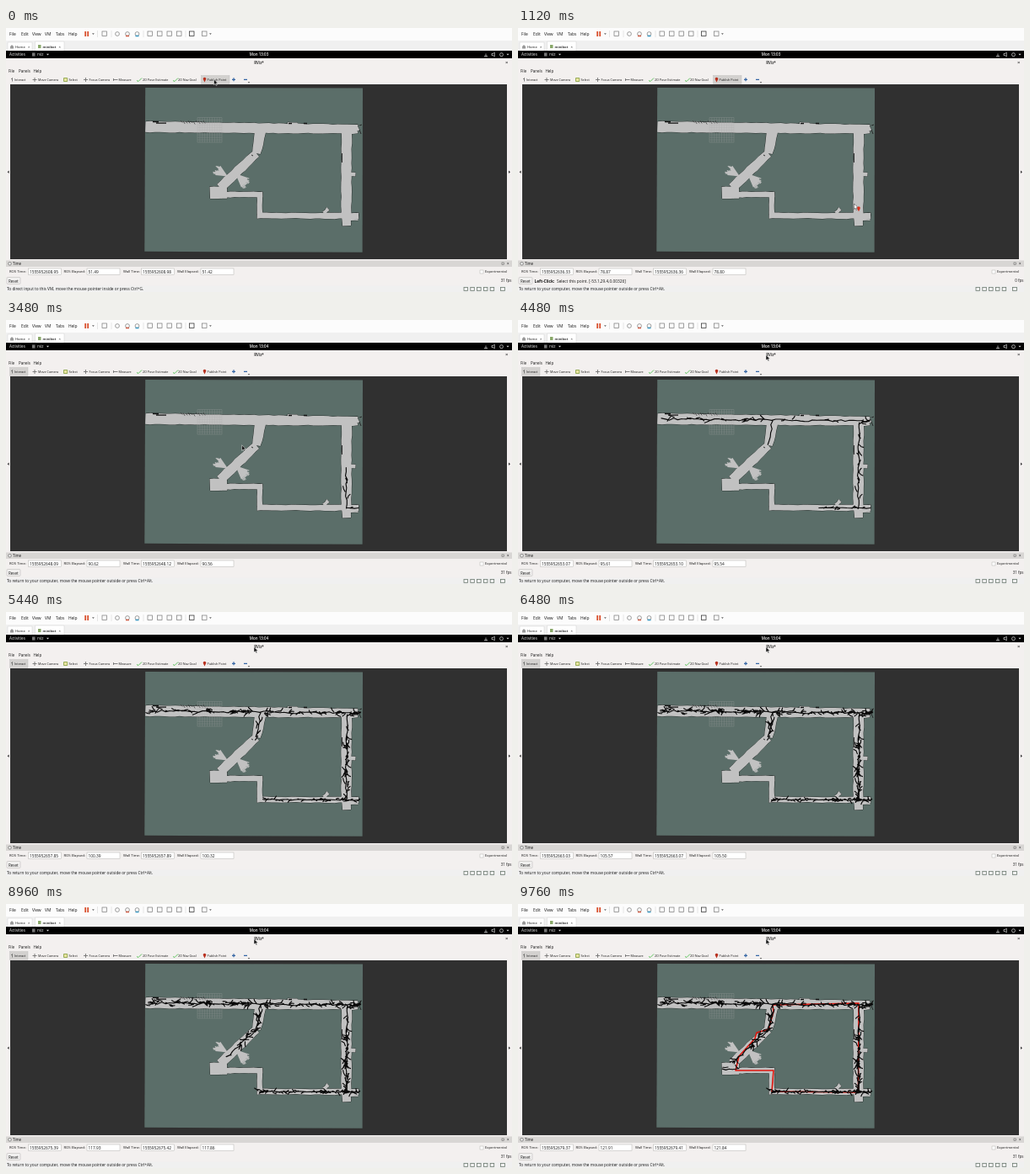
These frames come from a looping animation (600 px wide and 314 px high, 9800 ms). An HTML page:

```html
<!DOCTYPE html>
<html lang="en">
<head>
<meta charset="utf-8">
<title>RViz path planning</title>
<style>
  html, body { margin: 0; width: 100%; height: 100%; overflow: hidden; background: #fff; }
  svg { display: block; width: 100vw; height: 100vh; }
  text { font-family: "Open Sans", "Noto Sans", sans-serif; fill: #161616; white-space: pre; }
  .bold { font-weight: 700; }
  .semi { font-weight: 600; }
  .light { fill: #f0f0f0; }
</style>
</head>
<body>
<svg viewBox="0 0 600 314">
  <rect width="600" height="314" fill="#f3f0ef"/>

  <!-- virtual machine window -->
  <rect width="600" height="15" fill="#fcfcfc"/>
  <rect y="15" width="600" height="12" fill="#f0f0f0"/>
  <path d="M2 27V17H31V27M34.500 27V16H69V27" fill="#fff" stroke="#d0d0d0" stroke-width=".5"/>
  <path d="M5 22l2-2l2 2v2.500h-4z" fill="#999"/>
  <rect x="38" y="20" width="3.500" height="4" fill="#8aa86a"/>
  <path d="M93.300 4h1.800v6h-1.800zM96.300 4h1.800v6h-1.800z" fill="#d9502e"/>
  <path d="M102 6.300h2.800l-1.400 1.600zM241 6.300h2.800l-1.400 1.600z" fill="#666"/>
  <g id="vmIcons" fill="none" stroke="#777" stroke-width=".7"/>
  <path d="M142 9.500h4" stroke="#d0614a" stroke-width="1.600"/>
  <path d="M153.500 9.500h4" stroke="#3f9ac4" stroke-width="1.600"/>

  <!-- desktop bar -->
  <rect y="27" width="600" height="9" fill="#000"/>
  <rect x="31" y="29.500" width="3.500" height="4" fill="#777"/>
  <path d="M48 30.800h3l-1.500 1.700zM593.500 30.800h3l-1.500 1.700z" fill="#ddd"/>
  <path d="M567 33.500h4M569 33.500v-3M576 30.500h1.500l1.800-1.300v4.600l-1.800-1.300h-1.500z" fill="none" stroke="#ddd" stroke-width=".7"/>
  <circle cx="587.500" cy="31.700" r="2" fill="none" stroke="#ddd" stroke-width=".7"/>

  <!-- application window -->
  <rect id="interactOn" x="4.500" y="56.500" width="21.500" height="9.700" fill="#d3d1cf" stroke="#bbb" stroke-width=".4"/>
  <rect id="publishOn" x="231.500" y="56.500" width="33.500" height="9.700" fill="#d3d1cf" stroke="#bbb" stroke-width=".4"/>
  <g fill="none" stroke="#666" stroke-width=".8">
    <path d="M7.500 63.500v-4l-1.500 1.500M34 59v5M31.500 61.500h5M94.500 59v5M92 61.500h5M127.500 61.500h5M127.500 60v3"/>
    <path d="M68.500 59.500h4.200v4h-4.200z" stroke="#7f9c3a" fill="#e9e3a0"/>
    <path d="M155 62.500l2 1l4-4M198 62.500l2 1l4-4" stroke="#3cb83c"/>
    <path d="M270 59.300v4M268 61.300h4M282 61.300h4" stroke="#3465a4" stroke-width="1.200"/>
  </g>
  <path d="M286.800 64h2.400l-1.200 1.400z" fill="#555"/>
  <path d="M235.500 64.500l-1.700-3.400a1.800 1.800 0 1 1 3.400 0z" fill="#b8301e"/>

  <!-- 3D view with the map -->
  <rect x="5" y="67" width="589" height="208" fill="#303030"/>
  <path d="M3.600 169.500v3.500l-2-1.750zM596 169.500v3.500l2-1.750z" fill="#333"/>
  <path d="M165.200 71L423 71.600L422.600 266.800L164.300 265.800Z" fill="#5b6e69"/>
  <path id="walls" fill="none" stroke="#2b3230" stroke-width="1"/>
  <path id="floor" fill="#c1c1c1"/>
  <path id="fans" stroke="#c1c1c1" stroke-width="1.100"/>
  <path d="M174 111.500h7M178 113.200h12M335 113.500h4M353 113.500h4" stroke="#111" stroke-width="1.300"/>
  <path d="M398.500 149v11M291 151l2 1M419 116l3-1M419 121l2 5" stroke="#222" stroke-width=".9"/>
  <path id="hatch" stroke="#333" stroke-width=".7"/>
  <path id="grid" stroke="#a5a5a5" stroke-width=".45" opacity=".55"/>
  <path id="route" fill="none" stroke="#e0160e" stroke-width="1.600" stroke-linejoin="round"/>
  <path id="tree" fill="none" stroke="#080808" stroke-width="1.150" stroke-linecap="round" stroke-linejoin="round"/>

  <!-- time panel -->
  <rect y="276.500" width="600" height="7.500" fill="#d8d6d4"/>
  <circle cx="4.500" cy="280.300" r="1.800" fill="#eee" stroke="#555" stroke-width=".6"/>
  <rect x="588" y="279" width="2.500" height="2.500" fill="none" stroke="#555" stroke-width=".5"/>
  <g id="boxes" fill="#fff" stroke="#b5b2b0" stroke-width=".5">
    <rect x="562" y="288" width="4" height="4"/>
    <rect x="1" y="296.500" width="16" height="8" rx="1" fill="#f1f0ef"/>
  </g>

  <!-- status bar -->
  <rect y="306.500" width="600" height="7.500" fill="#f0f0f0"/>
  <g id="devices" fill="none" stroke="#6d7a70" stroke-width=".8"/>

  <g id="labels"></g>
  <g id="pointer">
    <path id="arrow" d="M0 0V6.500L1.600 5.200L2.700 7.500L3.800 7L2.700 4.800H4.800Z" stroke-width=".5"/>
    <path id="pin" d="M5.500 9.200l-1.500-3a1.800 1.800 0 1 1 3 0z" fill="#d8301c"/>
  </g>
</svg>
<script>
const LOOP = 9800, STEP = 40;
const $ = id => document.getElementById(id);
const show = (id, on) => $(id).setAttribute('visibility', on ? 'visible' : 'hidden');
const setPath = (id, d) => $(id).setAttribute('d', d);

function add(parent, tag, attrs) {
  const el = document.createElementNS('http://www.w3.org/2000/svg', tag);
  for (const k in attrs) el.setAttribute(k, attrs[k]);
  $(parent).append(el);
  return el;
}
function label(x, y, str, size, cls = '', anchor = 'start') {
  const el = add('labels', 'text', { x, y, 'font-size': size, class: cls, 'text-anchor': anchor });
  el.textContent = str;
  return el;
}
const row = (y, size, items) => items.forEach(([x, str]) => label(x, y, str, size));

// Text
row(8.8, 4.9, [[4, 'File'], [18, 'Edit'], [31, 'View'], [46, 'VM'], [59, 'Tabs'], [74, 'Help']]);
row(23.7, 4.2, [[11, 'Home'], [26, '×'], [62.5, '×']]);
label(43.5, 23.7, 'minibot', 4.2, 'semi');
row(52.7, 4.5, [[3, 'File'], [15, 'Panels'], [32.5, 'Help']]);
row(62.9, 3.75, [[10, 'Interact'], [38, 'Move Camera'], [74.5, 'Select'], [98.5, 'Focus Camera'],
  [133.5, 'Measure'], [162, '2D Pose Estimate'], [204, '2D Nav Goal'], [238.5, 'Publish Point']]);
row(282, 4.4, [[8, 'Time'], [594, '×']]);
row(291.4, 4.2, [[4, 'ROS Time:'], [68.5, 'ROS Elapsed:'], [139, 'Wall Time:'], [203, 'Wall Elapsed:'], [568, 'Experimental']]);
label(3, 302.5, 'Reset', 4.5);
label(4, 33.3, 'Activities', 4.6, 'light');
label(37, 33.3, 'rviz', 4.6, 'light');
label(300, 43.4, 'RViz*', 4.5, 'semi', 'middle');
label(592, 43.4, '×', 6);

const clock = label(300, 33.2, '', 4.5, 'light semi', 'middle');
const fields = [26.5, 96, 160.5, 231].map(x => {
  add('boxes', 'rect', { x, y: 286, width: 39, height: 7.6 });
  return label(x + 1.4, 291.5, '', 4.8);
});
const hintKey = label(19.5, 302.6, '', 4.8, 'bold');
const hint = label(46, 302.6, '', 4.8);
const fps = label(599.5, 301.6, '', 4.5, '', 'end');
const vmHint = label(1, 312.4, '', 4.75);

// Toolbar and tray icons
for (const x of [132, 144, 155.5]) add('vmIcons', 'circle', { cx: x, cy: 7, r: 2.4 });
for (const x of [114, 168, 179.5, 191, 202.5, 217.5, 232.5]) {
  add('vmIcons', 'rect', { x, y: 4, width: 5.5, height: 5.5, stroke: x === 217.5 ? '#222' : '#777' });
}
for (const x of [108.5, 125, 163, 213]) add('vmIcons', 'path', { d: `M${x} 3v8`, stroke: '#ddd' });
for (let i = 0; i < 5; i++) add('devices', 'rect', { x: 543 + i * 7.8, y: 308.5, width: 4.5, height: 4 });
add('devices', 'rect', { x: 586.5, y: 308.5, width: 5, height: 4 });

// Seeded random numbers
let seed = 20190;
function rnd() {
  seed = (seed + 0x6D2B79F5) | 0;
  let r = Math.imul(seed ^ seed >>> 15, 1 | seed);
  r = r + Math.imul(r ^ r >>> 7, 61 | r) ^ r;
  return ((r ^ r >>> 14) >>> 0) / 4294967296;
}
const spread = a => (rnd() * 2 - 1) * a;
const poly = pts => 'M' + pts.map(p => p.map(v => v.toFixed(1)).join(' ')).join('L');

// Corridors: ends, widths at both ends, and when the search tree passes
const start = [403.5, 224], corner = [404, 120], fork = [302, 120], elbow = [297, 149], den = [254, 190], bend = [301, 223];
const corridors = [
  { a: [417, 120.3], b: [165, 117.5], w: [10.5, 13], time: [3750, 4430] },
  { a: start, b: corner, w: [12, 12], time: [3150, 3800] },
  { a: [418, 223.5], b: [298, 223], w: [7, 6.5], time: [3150, 5600] },
  { a: fork, b: elbow, w: [14, 10], time: [4150, 4450] },
  { a: elbow, b: den, w: [10, 12], time: [6800, 9350] },
  { a: [262, 195.5], b: [242, 196], w: [14, 14], time: [9350, 9700] },
  { a: [404, 124], b: [418, 118], w: [6, 8], time: [3800, 4100] },
  { a: [301, 226], b: [301, 195], w: [6, 6] },
  { a: [304, 198], b: [255, 198], w: [6.5, 6.5] },
  { a: start, b: [404, 235], w: [12, 10] },
  { a: [409, 224.5], b: [418, 224.5], w: [9, 9] },
  { a: [409, 174], b: [414.5, 174], w: [4.5, 4.5] },
  { a: [377, 220], b: [382, 215], w: [4, 4] },
  { a: [334, 115], b: [346, 115], w: [5, 5] }
];

const twigs = [];
const twig = (t, ...pts) => twigs.push({ t, d: poly(pts) });

// Place along a corridor: f runs from end to end, s from wall to wall
function place({ a, b, w }, f, s) {
  const dx = b[0] - a[0], dy = b[1] - a[1], len = Math.hypot(dx, dy);
  const off = s * (w[0] + (w[1] - w[0]) * f) / 2;
  return [a[0] + dx * f - dy / len * off, a[1] + dy * f + dx / len * off];
}

function outline(c, len) {
  const n = Math.ceil(len / 6), side = s =>
    Array.from({ length: n + 1 }, (_, i) => place(c, i / n, s).map(v => v + spread(.45)));
  return poly([...side(-1), ...side(1).reverse()]) + 'Z';
}

function growTree(c, len, dir) {
  const [t0, t1] = c.time, at = f => t0 + (t1 - t0) * f;
  const n = Math.ceil(len / 5);
  let last = place(c, 0, 0);
  for (let i = 1; i <= n; i++) {
    const next = place(c, i / n * .98, spread(.22));
    twig(at(i / n), last, next);
    last = next;
  }
  const reach = 2.5 + Math.min(...c.w) * .35;
  for (let i = 0; i < len * .42; i++) {
    const f = rnd(), p = place(c, f, spread(.35));
    const late = rnd() > .27;
    const t = late ? Math.max(4500, at(f)) + rnd() * 1800 : at(f) + rnd() * 120;
    const a = dir + spread(.9) + (rnd() < .4 ? Math.PI : 0), l = reach * (.6 + rnd() * .4);
    const q = [p[0] + Math.cos(a) * l * .6, p[1] + Math.sin(a) * l * .6];
    const b = a + spread(.7);
    twig(t, p, q, [q[0] + Math.cos(b) * l * .5, q[1] + Math.sin(b) * l * .5]);
  }
}

let floor = '';
for (const c of corridors) {
  const dx = c.b[0] - c.a[0], dy = c.b[1] - c.a[1], len = Math.hypot(dx, dy);
  floor += outline(c, len);
  if (c.time) growTree(c, len, Math.atan2(dy, dx));
}
setPath('walls', floor);
// Separate shapes keep overlaps filled
setPath('floor', floor);
setPath('route', poly([start, bend, [303, 198], [258, 198], [262, 181], [281, 160], [283, 153], elbow, [303, 128], fork, [404, 118], start]));

// Scan rays, reference grid and hatching
function fan(x, y, angle, size) {
  let d = '';
  for (let i = 0; i < 12; i++) {
    const a = angle + (i / 11 - .5) * .85, r = size * (.65 + rnd() * .35);
    d += poly([[x, y], [x + Math.cos(a) * r, y + Math.sin(a) * r]]);
  }
  return d;
}
setPath('fans', fan(262, 176, -2.6, 18) + fan(273, 174, .75, 20));
let grid = '', hatch = '';
for (let i = 0; i <= 10; i++) grid += `M${227 + i * 2.9} 106.500v29.500M227 ${106.5 + i * 2.95}h29`;
for (let i = 0; i < 10; i++) hatch += `M${207 + i * 3} ${110 + i % 3 / 2}l2.200 ${2.5 + i % 2}`;
setPath('grid', grid);
setPath('hatch', hatch);

// Pointer legs: from time, to time, target
const button = [246.5, 61], pickA = [398.5, 209], pickB = [273, 198.5], title = [294, 41.5];
const legs = [[200, 800, pickA], [1320, 1960, button], [2080, 2400, pickB], [3120, 4080, title]];
const ease = f => f * f * (3 - 2 * f);

function pointerAt(t) {
  let [x, y] = button;
  for (const [t0, t1, to] of legs) {
    const f = ease(Math.min(1, Math.max(0, (t - t0) / (t1 - t0))));
    x += (to[0] - x) * f;
    y += (to[1] - y) * f;
  }
  return [x, y];
}

const STALL = 1080, RATE = .004982;
const rosTime = t => t < STALL ? 2608.95 + t * RATE : 2636.33 + (t - 1120) * RATE;

let shown = -1;
function draw(now) {
  requestAnimationFrame(draw);
  const t = Math.floor(now % LOOP / STEP) * STEP;
  if (t === shown) return;
  shown = t;

  const ros = rosTime(t), epoch = 1555950000;
  [epoch + ros, ros - 2557.463, epoch + ros + .033, ros - 2557.53]
    .forEach((v, i) => fields[i].textContent = v.toFixed(2));
  clock.textContent = ros < 2640 ? 'Mon 13:03' : 'Mon 13:04';
  fps.textContent = t >= STALL && t < STALL + 320 ? '0 fps' : '31 fps';
  vmHint.textContent = t < 200
    ? 'To direct input to this VM, move the mouse pointer inside or press Ctrl+G.'
    : 'To return to your computer, move the mouse pointer outside or press Ctrl+Alt.';

  const [x, y] = pointerAt(t);
  const publishing = t < 1320 || t >= 2080 && t < 3120;
  const picking = publishing && y > 71;
  show('publishOn', publishing);
  show('interactOn', !publishing);
  show('pin', picking);
  $('pointer').setAttribute('transform', `translate(${x.toFixed(2)} ${y.toFixed(2)})`);
  $('arrow').setAttribute('fill', picking ? '#fff' : '#111');
  $('arrow').setAttribute('stroke', picking ? '#222' : '#fff');

  // Map units at the pointer
  const dx = pickA[0] - x, dy = pickA[1] - y;
  const world = [(-53.1 + dx * .338).toFixed(1), (29.4 - dy * .324).toFixed(1), (.00326 - dx * .0000238).toPrecision(3)];
  hintKey.textContent = picking ? 'Left-Click:' : '';
  hint.textContent = picking ? `Select this point. [${world.map(Number)}]` : '';

  setPath('tree', twigs.filter(s => s.t <= t).map(s => s.d).join(''));
  show('route', t >= 9480);
}
requestAnimationFrame(draw);
</script>
</body>
</html>
```
